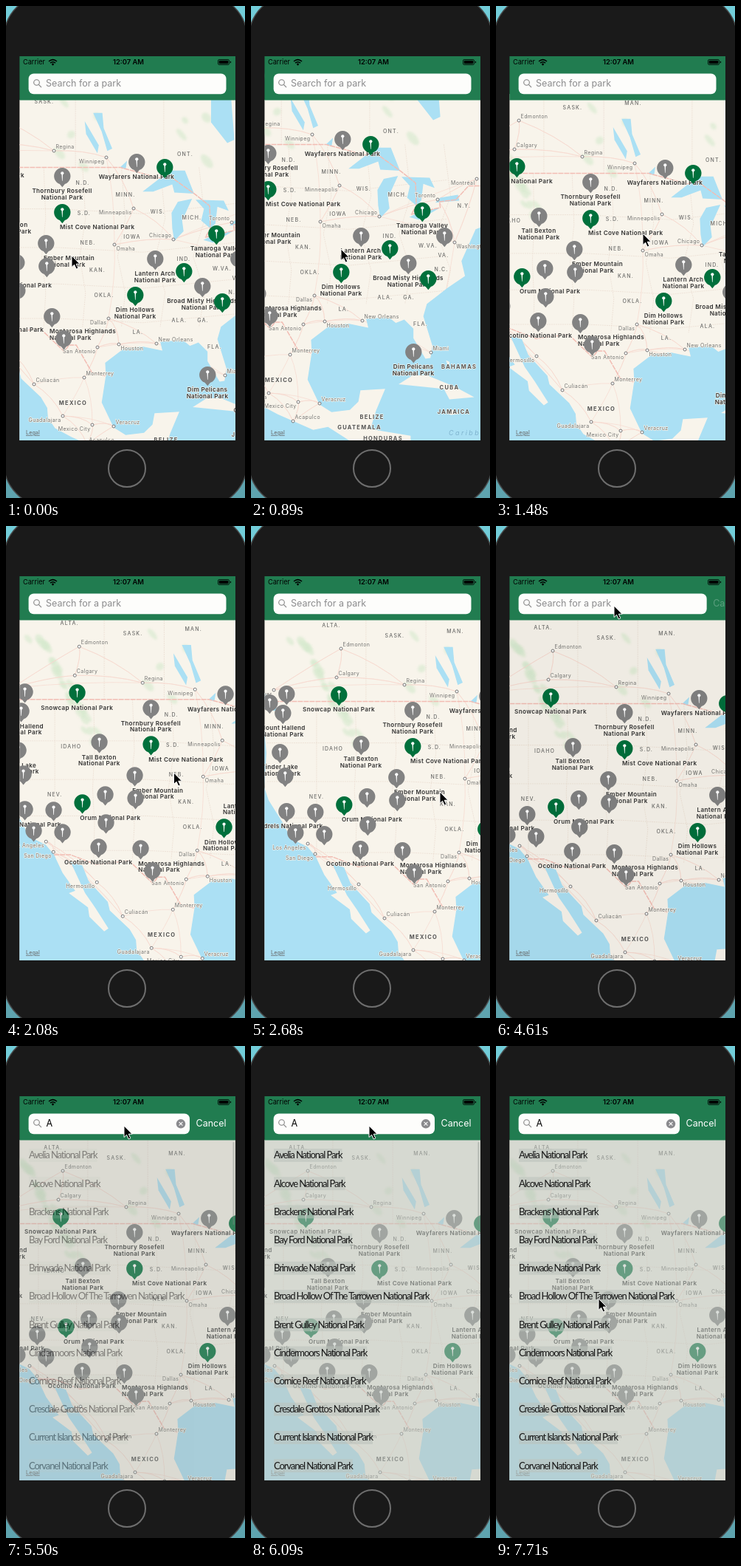
An HTML page for the animation above (8000 ms loop, 324x666 px).

```html
<!DOCTYPE html>
<html lang="en">
<head>
<meta charset="utf-8">
<title>Park finder</title>
<style>
html, body { margin: 0; width: 100%; height: 100%; overflow: hidden; background: linear-gradient(#72cdd9, #5ea3ae); }
svg { display: block; width: 100vw; height: 100vh; }
text { font-family: Inter, "Open Sans", sans-serif; }
.mid { text-anchor: middle; }
.end { text-anchor: end; }
.land { fill: #f8f4eb; }
.water { fill: #abe0f4; }
.wood { fill: #d5e9cd; opacity: .6; filter: blur(1.5px); }
.line { fill: none; stroke-linejoin: round; }
.state { stroke: #eadbd0; stroke-width: .7; stroke-dasharray: 2 1; }
.road { stroke: #f6d9cf; stroke-width: .7; }
.border { stroke: #f2bdb4; stroke-width: 1.5; stroke-dasharray: 7 1; }
.halo { paint-order: stroke; stroke: #f8f4eb; stroke-width: 1.3px; stroke-linejoin: round; }
.region { font-size: 7px; font-weight: 500; letter-spacing: 1.2px; fill: #6d6d6b; }
.country { font-size: 7.5px; font-weight: 700; letter-spacing: 1.3px; fill: #555; }
.city { font-size: 7px; letter-spacing: .42px; fill: #747472; }
.dot { fill: #fff; stroke: #777; stroke-width: 1; }
.park { font-size: 8.1px; font-weight: 600; letter-spacing: .35px; fill: #333; }
.sea { font-size: 9px; font-style: italic; letter-spacing: 2.4px; fill: #7fb4cf; }
.veil { fill: #bcc4bc; opacity: .55; }
.row { font: 13px Lato, sans-serif; letter-spacing: -1.1px; fill: #161616; }
.field { font-size: 12.5px; }
</style>
</head>
<body>
<svg viewBox="0 0 324 666" preserveAspectRatio="none">
  <defs><clipPath id="screen"><rect x="18.4" y="68" width="292.6" height="520"/></clipPath></defs>
  <rect x="-3" y="-16" width="330" height="694" rx="60" fill="#1a1a1a" stroke="#484a4b" stroke-width="1.5"/>
  <circle cx="164" cy="626" r="25" fill="#191919" stroke="#6e6e6e" stroke-width="2"/>
  <g clip-path="url(#screen)">
    <rect class="land" x="18" y="127" width="293" height="461"/>
    <g id="map"></g>
    <text x="27" y="580" font-size="7.3" fill="#666" text-decoration="underline">Legal</text>
    <rect id="dim" x="18" y="127" width="293" height="461"/>
    <g id="list"><rect class="veil" x="18" y="127" width="293" height="461"/></g>
    <rect id="thumb" x="307.5" y="130" width="2" height="112" rx="1" fill="#858c87" opacity=".4"/>
    <rect x="18" y="68" width="293" height="59.5" fill="#217c50"/>
    <text x="23" y="79.3" font-size="9.2">Carrier</text>
    <g fill="none" stroke="#000" stroke-width="1.6">
      <path d="M58 75q5.5-4.6 11 0M60 77.2q3.5-2.9 7 0"/>
      <circle cx="63.5" cy="79" r=".6"/>
    </g>
    <text class="mid" x="166" y="79.4" font-size="9.4" font-weight="600">12:07 AM</text>
    <rect x="287.5" y="72.5" width="15" height="7" rx="1.6" fill="none" stroke="#000" stroke-width=".8"/>
    <rect x="288.7" y="73.7" width="12.6" height="4.6" rx=".8"/>
    <path d="M303.8 74.6v3q1.4-.4 1.4-1.5t-1.4-1.5"/>
    <rect id="box" x="30.6" y="91.4" height="27.8" rx="7" fill="#fdfdfb"/>
    <g fill="none" stroke="#808080" stroke-width="1.1">
      <circle cx="41.5" cy="103.5" r="3.8"/><path d="M44.3 106.3l3.7 3.8"/>
    </g>
    <text id="hint" class="field" x="54" y="109.4" fill="#8c8c8e">Search for a park</text>
    <g id="typed">
      <text class="field" x="54.5" y="109.4">A</text>
      <circle cx="237" cy="105.3" r="6.2" fill="#8a8a8d"/>
      <path d="M234.6 102.9l4.8 4.8m0-4.8l-4.8 4.8" stroke="#fff" stroke-width="1.1"/>
    </g>
    <text id="cancel" class="field" y="109.4" fill="#fff">Cancel</text>
  </g>
  <path id="cursor" d="M0 0V15.5L3.6 12.2L6.2 18L8.8 16.8L6.2 11.2H11Z" stroke="#fff" stroke-width="1"/>
</svg>
<script>
const $ = id => document.getElementById(id);
const map = $('map');

function add(parent, tag, attrs, text) {
  const node = document.createElementNS('http://www.w3.org/2000/svg', tag);
  for (const key in attrs) node.setAttribute(key, attrs[key]);
  if (text) node.textContent = text;
  return parent.appendChild(node);
}

let seed = 7;
const random = () => (seed = seed * 16807 % 2147483647) / 2147483647;

// Mercator projection from degrees to map pixels.
function project(lon, lat) {
  const x = -66 + (lon + 118.24) * 9.572;
  const y = 757.9 - 548.4 * Math.log(Math.tan(Math.PI / 4 + lat * Math.PI / 360));
  return x.toFixed(1) + ' ' + y.toFixed(1);
}
const trace = coords => 'M' + coords.split(' ').map(p => project(...p.split(',').map(Number))).join('L');
const area = (kind, coords) => add(map, 'path', { class: kind, d: trace(coords) + 'Z' });
const line = (kind, coords) => add(map, 'path', { class: 'line ' + kind, d: trace(coords) });

// Forests follow the mountain chain, with a few strays to the east.
for (let i = 0; i < 34; i++) {
  const k = i / 24, stray = k >= 1;
  const x = stray ? 60 + 240 * random() : -90 + 85 * k + 16 * random();
  const y = stray ? 130 + 90 * random() : 122 + 150 * k + 16 * random();
  const [rx, ry] = [5 + 7 * random(), 3 + 3 * random()];
  add(map, 'ellipse', { class: 'wood', rx, ry, transform: `translate(${x} ${y}) rotate(50)` });
}

// State lines: a loose grid that wanders more towards the east.
for (let lat = 33; lat < 49; lat += 4) line('state', `-124,${lat} -104,${lat} -92,${lat - .5} -78,${lat + .6}`);
for (let lon = -117; lon < -78; lon += 5.5) {
  const sway = (lon + 117) / 40;
  line('state', `${lon},49 ${lon + sway},44 ${lon - sway},40 ${lon + sway},36 ${lon},32`);
}
for (const lon of [-110, -101.5, -89]) line('state', `${lon},57 ${lon},49`);

// Name; dot; side of the dot that carries the name.
const cities = 'Regina;65;196;NE|Winnipeg;136;205;SW|Minneapolis;173;274;SW|Chicago;227;316;NW|Omaha;147;323;SE|Toronto;306;293;NW|Montréal;359;265;SW|Dallas;139;423;SW|San Antonio;124;462;SW|Houston;153;458;SE|New Orleans;204;457;NE|Monterrey;106;503;NE|Culiacán;38;512;NE|Guadalajara;77;555;SW|Mexico City;117;567;SW|Veracruz;146;569;NE|Acapulco;110;593;NE|Miami;297;500;NE|Washington;329;351;SE|Edmonton;-21;147;NE|Calgary;-27;186;NE|Los Angeles;-66;411;SW|San Diego;-56;425;SW|Hermosillo;3;466;SW|Vancouver;-112;203;SW'
  .split('|').map(entry => {
    const [name, x, y, side] = entry.split(';');
    return { name, x: +x, y: +y, side };
  });

// Roads join every city to its three nearest neighbours.
for (const city of cities) {
  const reach = other => Math.hypot(other.x - city.x, other.y - city.y);
  [...cities].sort((a, b) => reach(a) - reach(b)).slice(1, 4).forEach(({ x, y }) =>
    add(map, 'path', { class: 'line road', d: `M${city.x} ${city.y}Q${(city.x + x) / 2 + 6} ${(city.y + y) / 2 - 6} ${x} ${y}` }));
}

// Pacific, then the Gulf and the Atlantic.
area('water', '-140,50 -124.7,48.4 -124.1,44 -124.4,40.4 -123.8,39 -121.9,36.6 -120.6,34.6 -118.3,33.7 -117.1,32.5 -115.9,30.3 -114.1,28.1 -115,27.8 -112.3,26 -112.1,24.8 -110,22.9 -109.4,23.3 -111.3,26 -112.7,27.8 -114.8,31.7 -113.1,31.2 -112.2,29.3 -109.5,26.7 -109.2,25.6 -106.4,23.2 -105.5,21.8 -105.4,20.5 -104.4,19.1 -102,17.9 -97,15.8 -94.9,16.2 -92,14.4 -87.5,13 -87.5,8 -140,8');
area('water', '-83.2,15 -88.9,15.9 -88.1,18.4 -86.8,21.3 -90.3,21.1 -90.6,19.6 -91.8,18.5 -94.4,18.2 -96.1,19.2 -97.8,22.5 -97.2,26 -97.3,27.6 -94.6,29.4 -92,29.6 -89.2,29.1 -89.5,30.2 -86.3,30.4 -85.3,29.7 -84.1,30.1 -82.8,29 -82.8,27.8 -81.1,25.2 -80.4,25.3 -80.1,26.8 -81.4,30.5 -80.9,32 -78,33.9 -75.5,35.3 -76,37 -74,40.5 -70,41.7 -60,44 -60,8 -83.2,8');
[
  '-92,46.7 -89.5,48 -88.2,48.7 -86,48.7 -84.7,46.5 -87.5,46.6 -87.8,47.4 -90.5,46.7',
  '-87.5,41.7 -87.8,43 -87.9,44.6 -87,45.7 -85,46 -86.4,43.8 -86.2,42.7',
  '-84.5,45.9 -80.5,45.8 -79.8,44.8 -81.4,45.2 -81.7,43.5 -82.4,43 -83.7,43.8 -83.3,45',
  '-83.4,41.8 -82,42.3 -79,42.8 -82,41.5', '-79.7,43.3 -79,43.8 -76.5,44.1 -76.3,43.5',
  '-97,50.5 -96.3,50.7 -97.5,52.5 -97.7,53.8 -99,53.8 -97.8,52.2',
  '-98.4,50.3 -98.2,51 -100.2,53.1 -100,52', '-95.2,49 -94.4,48.8 -94.2,49.6',
  '-82.3,55.3 -82.3,53 -80,51.2 -79,51.5 -79.5,55.3',
  '-126,50.4 -123.2,49.3 -122.2,47.5 -122.8,48.1 -124.7,48.4 -123.5,48.5'
].forEach(coords => area('water', coords));
area('land', '-84.9,21.9 -83,23 -81,23.1 -77,21.6 -74.2,20.2 -77.7,19.9 -78.5,21.3');
area('land', '-78.3,18.3 -77.2,18.5 -76.3,18 -77.5,17.8');
area('land', '-78.2,25 -77.7,24.8 -77.7,23.8');

line('border', '-123,49 -95.2,49 -89.6,48 -88.4,48.3 -84.5,46.4 -82.5,45.3 -82.4,43 -83.1,42.1 -79,42.8 -79.1,43.4 -76.8,43.6 -75,45 -71,45');
line('border', '-117.1,32.5 -114.8,32.5 -111.1,31.3 -106.5,31.8 -103.1,29 -102.4,29.8 -101.4,29.8 -99.2,26.4 -97.2,25.9');

// Name; centre of the text.
function names(kind, entries) {
  for (const entry of entries.split('|')) {
    const [name, x, y] = entry.split(';');
    add(map, 'text', { class: `halo mid ${kind}`, x, y: +y + 2.6 }, name);
  }
}
names('region', 'SASK.;52;129|N.D.;104;239|S.D.;106;280|MINN.;162;255|WIS.;206;278|MICH.;252;286|ONT.;243;200|NEB.;111;320|IOWA;171;312|KAN.;124;357|OKLA.;133;391|ALA.;235;425|GA.;267;425|LA.;179;441|FLA.;283;461|IND.;241;342|W.VA.;293;355|N.C.;311;387|VA.;314;368|N.Y.;342;301|MAN.;134;123|ALTA.;-34;115|IDAHO;-32;282|NEV.;-54;347');
names('country', 'MEXICO;91;537|BELIZE;217;587|CUBA;322;547|BAHAMAS;335;519|JAMAICA;328;580|GUATEMALA;200;601|HONDURAS;232;616');
add(map, 'text', { class: 'sea', x: 321, y: 612 }, 'Caribbean Sea');

for (const { name, x, y, side } of cities) {
  const east = side[1] === 'E';
  add(map, 'text', {
    class: 'halo city' + (east ? '' : ' end'), x: x + (east ? 2.5 : -2.5), y: y + (side[0] === 'N' ? -3.4 : 7.8)
  }, name);
  add(map, 'circle', { class: 'dot', cx: x, cy: y, r: 2 });
}

// Pin centre, then its name; "+" marks an open park, "<" a label that starts at the pin.
const parks = '177;211;Wayfarers|215;218;+|76;230;Thornbury Rosefell|76;279;+<Mist Cove|54;321;<Ember Mountain|55;352;|285;308;+Tamaroga Valley|202;342;Lantern Arch|241;359;+|266;379;Broad Misty Highlands|293;400;+|175;391;+Dim Hollows|62;420;<Montarosa Highlands|78;450;|273;499;Dim Pelicans|14;347;|15;385;|315;342;|-24;209;+Snowcap|6;276;Tall Bexton|-17;358;+<Orum|5;418;Ocotino|-95;208;|-118;220;|-100;234;Mount Hallend|-104;287;Tinder Lake|-97;319;|-95;367;Spindrels|-56;368;|-83;396;|-44;398;'
  .split('|').map(entry => {
    const [x, y, label] = entry.split(';');
    return { x: +x, y: +y, open: label.includes('+'), left: label.includes('<'), name: label.replace(/[+<]/g, '') };
  }).sort((a, b) => a.y - b.y);

for (const { x, y, left, name } of parks) {
  if (!name) continue;
  const lines = name.length > 9 ? [name, 'National Park'] : [name + ' National Park'];
  lines.forEach((text, i) => add(map, 'text', {
    class: 'halo park' + (left ? '' : ' mid'), x: left ? x - 3 : x, y: y + 23.4 + i * 8.5
  }, text));
}
for (const { x, y, open } of parks) {
  const pin = add(map, 'g', { transform: `translate(${x + .3} ${y + .3})` });
  add(pin, 'path', { d: 'M-3.5 10.6L0 15L3.5 10.6A11.2 11.2 0 1 0 -3.5 10.6Z', fill: open ? '#00703c' : '#828282' });
  add(pin, 'path', { d: 'M-.8-3H.8L.3 6.5H-.3Z', fill: '#fff' });
  add(pin, 'circle', { cy: -4, r: 2.1, fill: '#fff' });
}

['Avelia', 'Alcove', 'Brackens', 'Bay Ford', 'Brinwade', 'Broad Hollow Of The Tarrowen', 'Brent Gulley',
  'Cindermoors', 'Cornice Reef', 'Cresdale Grottos', 'Current Islands', 'Corvanel'
].forEach((name, i) => {
  const y = 148 + i * 38.2;
  const patch = add($('list'), 'rect', { class: 'veil', x: 31, y: y - 9, height: 18 });
  const row = add($('list'), 'text', { class: 'row', x: 31, y: y + 4.3 }, name + ' National Park');
  patch.setAttribute('width', row.getComputedTextLength());
});

const easeOut = k => k * (2 - k);
const smooth = k => k * k * (3 - 2 * k);
const ramp = (tick, from, to) => smooth(Math.min(1, Math.max(0, (tick - from) / (to - from))));

// Stops: tick, x, y.
const pan = [[0, 0, 0], [6, -53, -31], [10, 52, 8], [18, 143, 19], [29, 98, 22]];
const pointer = [[0, 89, 338], [6, 122, 329], [10, 199, 308], [18, 256, 360], [31, 160, 108], [47, 160, 108], [51, 139, 342]];

function move(node, stops, tick, ease) {
  const next = stops.findIndex(s => s[0] > tick);
  const b = stops.at(next), a = next < 0 ? b : stops[next - 1];
  const k = a === b ? 0 : ease((tick - a[0]) / (b[0] - a[0]));
  node.setAttribute('transform', `translate(${a[1] + (b[1] - a[1]) * k} ${a[2] + (b[2] - a[2]) * k})`);
}
const show = (node, on) => node.setAttribute('visibility', on ? 'visible' : 'hidden');

function draw(time) {
  const tick = Math.floor((time + 8) / 148.4);
  move(map, pan, tick, easeOut);
  move($('cursor'), pointer, tick, smooth);

  const open = ramp(tick, 30, 33), results = ramp(tick, 36, 38);
  const right = 298.5 - 49.5 * open;
  $('box').setAttribute('width', right - 30.6);
  $('cancel').setAttribute('x', right + 8.5);
  $('cancel').setAttribute('opacity', open);
  $('dim').setAttribute('opacity', .13 * open * (1 - results));
  $('list').setAttribute('opacity', results);

  const typed = tick >= 37;
  show($('hint'), !typed);
  show($('typed'), typed);
  show($('thumb'), typed && tick < 42);
}

const start = performance.now();
function loop() {
  draw((performance.now() - start) % 8000);
  requestAnimationFrame(loop);
}
loop();
</script>
</body>
</html>
```
